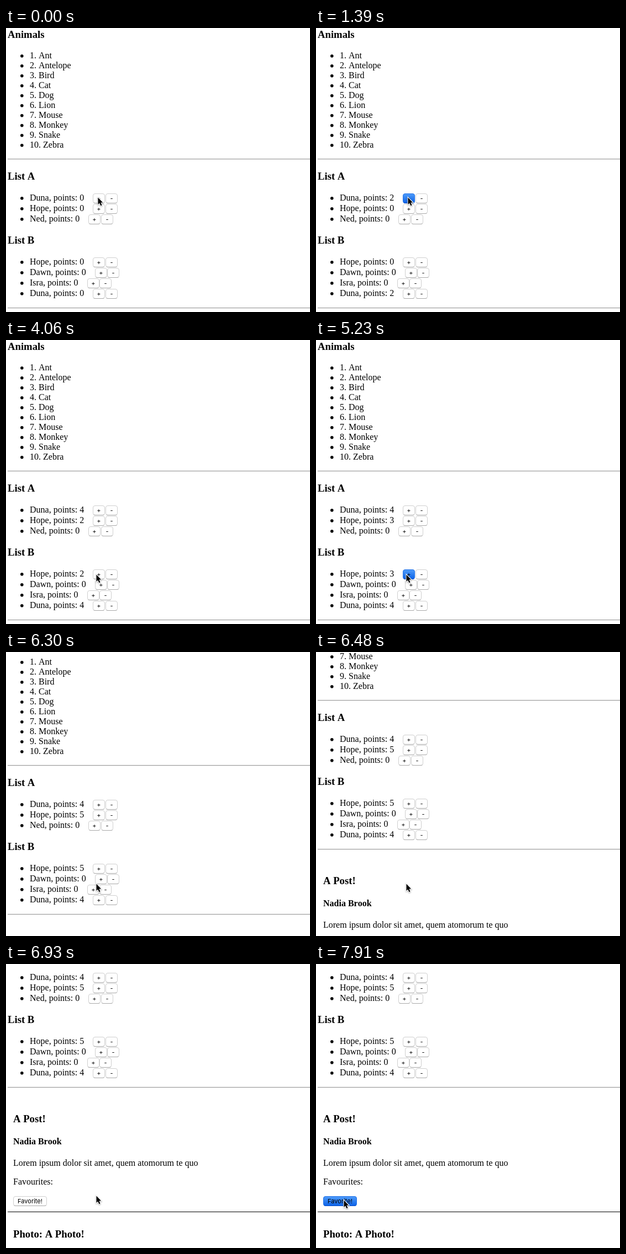
Recreate the animation shown at these times as an HTML page. Size 550x515 px, loop 8000 ms.

```html
<!DOCTYPE html>
<html lang="en">
<head>
<meta charset="utf-8">
<title>Lists</title>
<style>
  html, body { margin: 0; width: 550px; height: 515px; overflow: hidden; background: #fff; }
  svg { display: block; }
  text { font: 16px "Liberation Serif", Times, serif; font-kerning: none; }
  .h { font-size: 18.72px; font-weight: bold; }
  .b { font-weight: bold; }
  .btn text { font: 11px Inter, Roboto, sans-serif; text-anchor: middle; }
  .face { fill: #fff; stroke: #cfcfcf; }
  .edge { fill: none; stroke: #a9a9a9; }
  .down .face { fill: url(#blue); stroke: #2272e8; }
  .down .edge { stroke: #0a50c8; }
  #cursor { filter: drop-shadow(0 1px 1px #0005); }
</style>
</head>
<body>
<svg width="550" height="515" viewBox="0 0 550 515">
  <defs>
    <linearGradient id="blue" x2="0" y2="1">
      <stop stop-color="#4f9cfa"/>
      <stop offset="1" stop-color="#0b62e8"/>
    </linearGradient>
  </defs>
  <g id="page"></g>
  <path id="cursor" d="M.5 .5V13L3.3 10.4L5.4 15.3L7.5 14.4L5.5 9.6L9.2 9.4Z"
        stroke="#fff" stroke-width="2" paint-order="stroke"/>
</svg>
<script>
const page = document.getElementById('page');
const cursor = document.getElementById('cursor');

function add(parent, tag, attrs, content = '') {
  const el = document.createElementNS('http://www.w3.org/2000/svg', tag);
  for (const k in attrs) el.setAttribute(k, attrs[k]);
  el.textContent = content;
  return parent.appendChild(el);
}
const text = (x, y, s, cls = '') => add(page, 'text', { x, y, class: cls }, s);
const line = (y, fill) => add(page, 'rect', { x: 3, y, width: 547, height: 1, fill });
const rule = y => { line(y, '#9a9a9a'); line(y + 1, '#eee'); };

function item(y, s) {
  add(page, 'circle', { cx: 28.8, cy: y - 4.2, r: 2.8 });
  return text(43, y, s);
}
function button(x, y, w, label) {
  const g = add(page, 'g', { class: 'btn' });
  add(g, 'rect', { class: 'face', x: x + .5, y: y + .5, width: w - 1, height: 17, rx: 3.5 });
  add(g, 'path', { class: 'edge', d: `M${x + 1.5} ${y + 16.7}q1 .8 2.5 .8h${w - 8}q1.5 0 2.5-.8` });
  add(g, 'text', { x: x + w / 2, y: y + 13 }, label);
  return g;
}

// Page content
text(3, 18, 'Animals', 'h');
'Ant Antelope Bird Cat Dog Lion Mouse Monkey Snake Zebra'.split(' ')
  .forEach((name, i) => item(55 + 18 * i, `${i + 1}. ${name}`));
rule(237);

const caption = (name, points) => `${name}, points: ${points}`;
function list(title, top, names) {
  text(3, top, title, 'h');
  return names.map((name, i) => {
    const y = top + 38 + 19 * i;
    const label = item(y, caption(name, 0));
    const x = 43 + label.getComputedTextLength() + 16;
    const plus = button(Math.round(x), y - 13, 22, '+');
    button(Math.round(x + 22.5), y - 13, 22, '-');
    return { name, label, plus };
  });
}
const listA = list('List A', 275, ['Duna', 'Hope', 'Ned']);
const listB = list('List B', 391, ['Hope', 'Dawn', 'Isra', 'Duna']);
rule(507);

text(13, 571, 'A Post!', 'h');
text(13, 611, 'Nadia Brook', 'b');
text(13, 650, 'Lorem ipsum dolor sit amet, quem atomorum te quo');
text(13, 684, 'Favourites:');
const favorite = button(13, 705, 61, 'Favorite!');
line(733, '#000');
text(13, 780, 'Photo: A Photo!', 'h');

// Mouse clicks as [down, up] in ms; a point counts on release
const LOOP = 8000, STEP = 89.28;
const clicks = {
  Duna: [[500, 590], [950, 1040], [1300, 1480], [1660, 1740]],
  Hope: [[3700, 3790], [3970, 4060], [4420, 4510], [5230, 5320], [5590, 5590]]
};
const presses = [
  [listA[0].plus, clicks.Duna],
  [listB[0].plus, clicks.Hope],
  [favorite, [[7910, LOOP]]]
];

const ramp = (t, a, b) => Math.min(1, Math.max(0, (t - a) / (b - a)));
const smooth = (t, a, b) => { const u = ramp(t, a, b); return u * u * (3 - 2 * u); };

// A slow start that swings over into a quick glide, then a short nudge
function scrollTop(t) {
  const u = ramp(t, 5960, 6660);
  return 272 * u * u / (u * u + 7 * (1 - u) ** 2) + 12 * ramp(t, 6750, 6930);
}

// Down to List B, then in a shallow arc to the favorite button
function pointer(t) {
  const arc = smooth(t, 7050, 7820);
  return [
    166 - 3 * ramp(t, 2107, 3000) - 113 * arc,
    307 + 118 * smooth(t, 2107, 3400) - 5 * ramp(t, 6030, 6220)
      + 8 * arc - 10 * Math.sin(Math.PI * arc)
  ].map(Math.round);
}

function draw(t) {
  for (const { name, label } of [...listA, ...listB]) {
    const points = (clicks[name] || []).filter(([, up]) => up <= t).length;
    label.textContent = caption(name, points);
  }
  for (const [el, spans] of presses)
    el.classList.toggle('down', spans.some(([down, up]) => t >= down && t < up));

  // scrolling and pointer advance in steps
  const s = 500 + Math.floor((t - 480) / STEP) * STEP;
  page.setAttribute('transform', `translate(0 ${-Math.round(scrollTop(s))})`);
  cursor.setAttribute('transform', `translate(${pointer(s)})`);
}

const start = performance.now();
function tick() {
  draw((performance.now() - start) % LOOP);
  requestAnimationFrame(tick);
}
tick();
</script>
</body>
</html>
```
